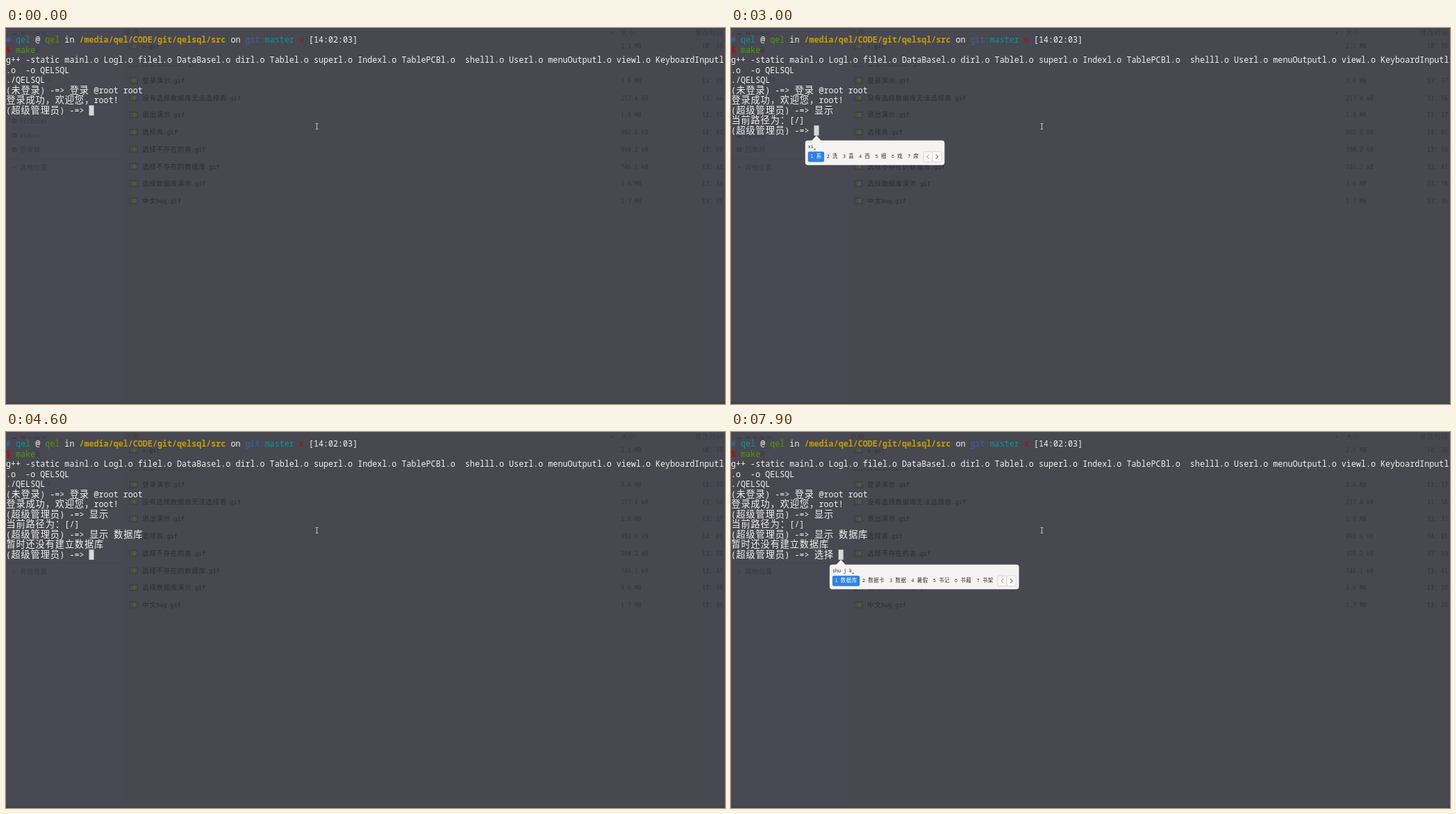
Write an HTML page with a canvas that moves like this. It is 1035 px wide and 541 px high and loops after 8000 ms.

```html
<!DOCTYPE html>
<html lang="zh">
<head>
<meta charset="utf-8">
<style>
html, body { margin: 0; width: 100%; height: 100%; overflow: hidden; background: #484851; }
canvas { display: block; }
</style>
</head>
<body>
<canvas id="stage" width="1035" height="541"></canvas>
<script>
const ctx = document.getElementById('stage').getContext('2d');
const LOOP = 8000, CELL = 7.03, ROW = 14.5, TOP = 9.8;
const BG = '#484851', WHITE = '#f2f2f2', CYAN = '#06989a', GREEN = '#4e9a06', BLUE = '#3465a4', YELLOW = '#c4a000', RED = '#cc0000';
const LATIN = '"Noto Sans Mono", "DejaVu Sans Mono", monospace';
const HAN = '"Noto Sans CJK SC", "Noto Sans Mono CJK SC", sans-serif';

const PROMPT = '(超级管理员) -=> ';
const HEAD = [
  [['#', BLUE, 1], [' qel', CYAN], [' @', WHITE], [' qel', GREEN], [' in ', WHITE],
   ['/media/qel/CODE/git/qelsql/src', YELLOW, 1], [' on ', WHITE], ['git:', BLUE], ['master', CYAN], [' x', RED], [' [14:02:03]', WHITE]],
  [['$', RED, 1], [' make', GREEN]],
  'g++ -static mainl.o Logl.o filel.o DataBasel.o dirl.o Tablel.o superl.o Indexl.o TablePCBl.o  shelll.o Userl.o menuOutputl.o viewl.o KeyboardInputl',
  '.o  -o QELSQL',
  './QELSQL',
  '(未登录) -=> 登录 @root root',
  '登录成功，欢迎您，root!'
];
const OUTPUT = [PROMPT + '显示', '当前路径为：[/]', PROMPT + '显示 数据库', '暂时还没有建立数据库'];

// Input method candidates for each spelling
const CANDIDATES = {
  'x': '下 先 写 系 新 小 想',
  'xi': '系 洗 喜 西 细 戏 席',
  'xia': '下 吓 夏 虾 瞎 峡 霞',
  'xian': '先 现 线 西安 县 限 显',
  'xian s': '显示 现实 先生 线索 限时 闲散 现身',
  'xian sh': '显示 现实 先生 限时 现身 闲书 献身',
  'xian shi': '显示 现实 限时 先是 县市 闲事 显式',
  's': '是 上 说 时 三 所 水',
  'sh': '是 上 说 时 水 少 谁',
  'shu j': '数据 暑假 书记 书籍 书架 树脚 输家',
  'shu j k': '数据库 数据卡 数据 暑假 书记 书藉 书架'
};

// [start time, finished output lines, typed text, spelling]
const STEPS = [
  [0, 0, '', ''], [200, 0, '', 'x'], [700, 0, '', 'xi'], [800, 0, '', 'xia'], [900, 0, '', 'xian'],
  [1000, 0, '', 'xian s'], [1100, 0, '', 'xian sh'], [1200, 0, '', 'xian shi'], [1300, 0, '显示', ''],
  [1600, 2, '', ''], [2200, 2, '', 'x'], [3000, 2, '', 'xi'], [3200, 2, '', 'xia'], [3300, 2, '', 'xian'],
  [3400, 2, '', 'xian s'], [3500, 2, '', 'xian shi'], [3600, 2, '显示', ''], [3800, 2, '显示 ', ''],
  [4000, 2, '显示 ', 's'], [4100, 2, '显示 ', 'sh'], [4200, 2, '显示 ', 'shu j'], [4300, 2, '显示 ', 'shu j k'],
  [4400, 2, '显示 数据库', ''], [4600, 4, '', ''],
  [6100, 4, '', 'x'], [6400, 4, '', 'xi'], [6500, 4, '', 'xia'], [6600, 4, '', 'xian'], [6700, 4, '', 'xian s'],
  [6900, 4, '', 'xian'], [7100, 4, '', ''], [7200, 4, '选择', ''], [7300, 4, '选择 ', ''],
  [7500, 4, '选择 ', 's'], [7600, 4, '选择 ', 'sh'], [7800, 4, '选择 ', 'shu j'], [7900, 4, '选择 ', 'shu j k']
];

const FILES = [
  ['1.gif', '2.1 MB', '10：35'], ['建立表的演示.gif', '3.7 MB', '13：39'], ['登录演示.gif', '3.6 MB', '13：37'],
  ['没有选择数据库无法选择表.gif', '217.4 kB', '13：56'], ['退出演示.gif', '1.8 MB', '13：37'],
  ['选择表.gif', '992.6 kB', '14：01'], ['选择不存在的表.gif', '398.2 kB', '13：59'],
  ['选择不存在的数据库.gif', '746.1 kB', '13：41'], ['选择数据库演示.gif', '3.6 MB', '13：38'], ['中文bug.gif', '1.7 MB', '13：35']
];
const PLACES = ['最近使用', '主目录', '桌面', 'Documents', 'Downloads', 'Music', 'Pictures', 'Videos', '回收站'];

const isWide = c => c > '\u2fff';
const cells = s => [...s].reduce((n, c) => n + (isWide(c) ? 2 : 1), 0);

function rect(x, y, w, h, color, radius = 0) {
  ctx.fillStyle = color;
  ctx.beginPath();
  ctx.roundRect(x, y, w, h, radius);
  ctx.fill();
}

// Draws text on a grid of half-width cells and returns the end position
function put(s, x, y, cell, color, bold) {
  const latin = `${bold ? 'bold ' : ''}${cell / 0.6}px ${LATIN}`;
  const han = `300 ${cell * 1.88}px ${HAN}`;
  ctx.fillStyle = color;
  for (const c of s) {
    const wide = isWide(c);
    ctx.font = wide ? han : latin;
    ctx.fillText(c, x + (wide ? cell * 0.06 : 0), y);
    x += cells(c) * cell;
  }
  return x;
}

function drawFileManager() {
  rect(0, 0, 167, 541, '#494953');
  rect(0, 188, 167, 1, '#45454e');
  rect(0, 538, 1035, 3, '#43434e');
  PLACES.forEach((name, i) => {
    const y = 11 + i * 20.5;
    rect(8.5, y - 3, 7, 6, '#3b3b43', 1);
    rect(10.5, y - 1, 3, 2, '#494953');
    put(name, 20, y + 3.2, 4.9, '#393941');
  });
  put('+', 9, 203.5, 4.9, '#393941');
  put('其他位置', 20, 203.5, 4.9, '#393941');
  put('名称', 172, 9.5, 5, '#3d3d45');
  put('▾', 869, 9.5, 5, '#34343b');
  put('大小', 885, 9.5, 5, '#3a3a42');
  put('修改时间', 992, 9.5, 5, '#3a3a42');
  FILES.forEach(([name, size, time], i) => {
    const y = 26 + i * 24.75;
    rect(177, y - 5, 13, 10, '#394346', 1);
    rect(179, y - 3, 4, 6, '#455340');
    rect(183, y - 3, 4, 6, '#5f5539');
    rect(187, y - 3, 2, 6, '#3f4c5a');
    put(name, 196, y + 3.3, 5.07, '#2d2d34');
    put(size, 885, y + 3.3, 4.95, '#35353c');
    put(time, 1002, y + 3.3, 5, '#35353c');
  });
}

function drawLine(line, row) {
  const parts = typeof line === 'string' ? [[line, WHITE]] : line;
  const y = TOP + row * ROW;
  let x = 0;
  for (const [s, color, bold] of parts) {
    rect(x, y, cells(s) * CELL, ROW, BG);
    x = put(s, x, y + 11.4, CELL, color, bold);
  }
  return x;
}

function drawPopup(spelling, cursorX, y) {
  const words = CANDIDATES[spelling].split(' ');
  const widths = words.map(w => 15.3 + w.length * 8);
  const total = widths.reduce((a, b) => a + b);
  const left = cursorX - 12.7, mid = cursorX + 3.5, top = y + 7;
  rect(left, top, total + 37.5, 35.5, '#f4f3f1', 4);
  ctx.beginPath();
  ctx.moveTo(mid, y);
  ctx.lineTo(mid + 7, top + 0.5);
  ctx.lineTo(mid - 7, top + 0.5);
  ctx.fill();

  const end = put(spelling, left + 4, top + 11.5, 4, '#303030');
  rect(end + 0.5, top + 12, 2.5, 1, '#303030');

  let x = left + 4;
  words.forEach((word, i) => {
    if (!i) rect(x, top + 16, widths[0], 15, '#3081e3', 2);
    put(`${i + 1} ${word}`, x + 3.65, top + 25, 4, i ? '#303030' : '#fff');
    x += widths[i];
  });

  x += 3;
  ctx.lineWidth = 1;
  for (const dir of [-1, 1]) {
    rect(x, top + 16, 13, 15, dir < 0 ? '#f7f6f5' : '#fff', 2);
    ctx.strokeStyle = '#d8d5d1';
    ctx.stroke();
    ctx.strokeStyle = dir < 0 ? '#888' : '#222';
    ctx.beginPath();
    ctx.moveTo(x + 6.5 - dir * 1.5, top + 20.5);
    ctx.lineTo(x + 6.5 + dir * 1.5, top + 23.5);
    ctx.lineTo(x + 6.5 - dir * 1.5, top + 26.5);
    ctx.stroke();
    x += 13;
  }
}

function drawPointer() {
  rect(447, 137.5, 1, 8, '#c8c8cc');
  rect(445.5, 137, 4, 1, '#b0b0b5');
  rect(445.5, 145, 4, 1, '#b0b0b5');
}

function draw(now) {
  const t = now % LOOP;
  const [, done, typed, spelling] = STEPS.findLast(step => step[0] <= t);
  rect(0, 0, 1035, 541, BG);
  drawFileManager();
  const lines = [...HEAD, ...OUTPUT.slice(0, done), PROMPT + typed];
  let x;
  lines.forEach((line, row) => { x = drawLine(line, row); });
  const y = TOP + (lines.length - 1) * ROW;
  rect(x, y, CELL, ROW, '#d9d9d9');
  drawPointer();
  if (spelling) drawPopup(spelling, x, y + ROW);
  requestAnimationFrame(draw);
}
requestAnimationFrame(draw);
</script>
</body>
</html>
```
